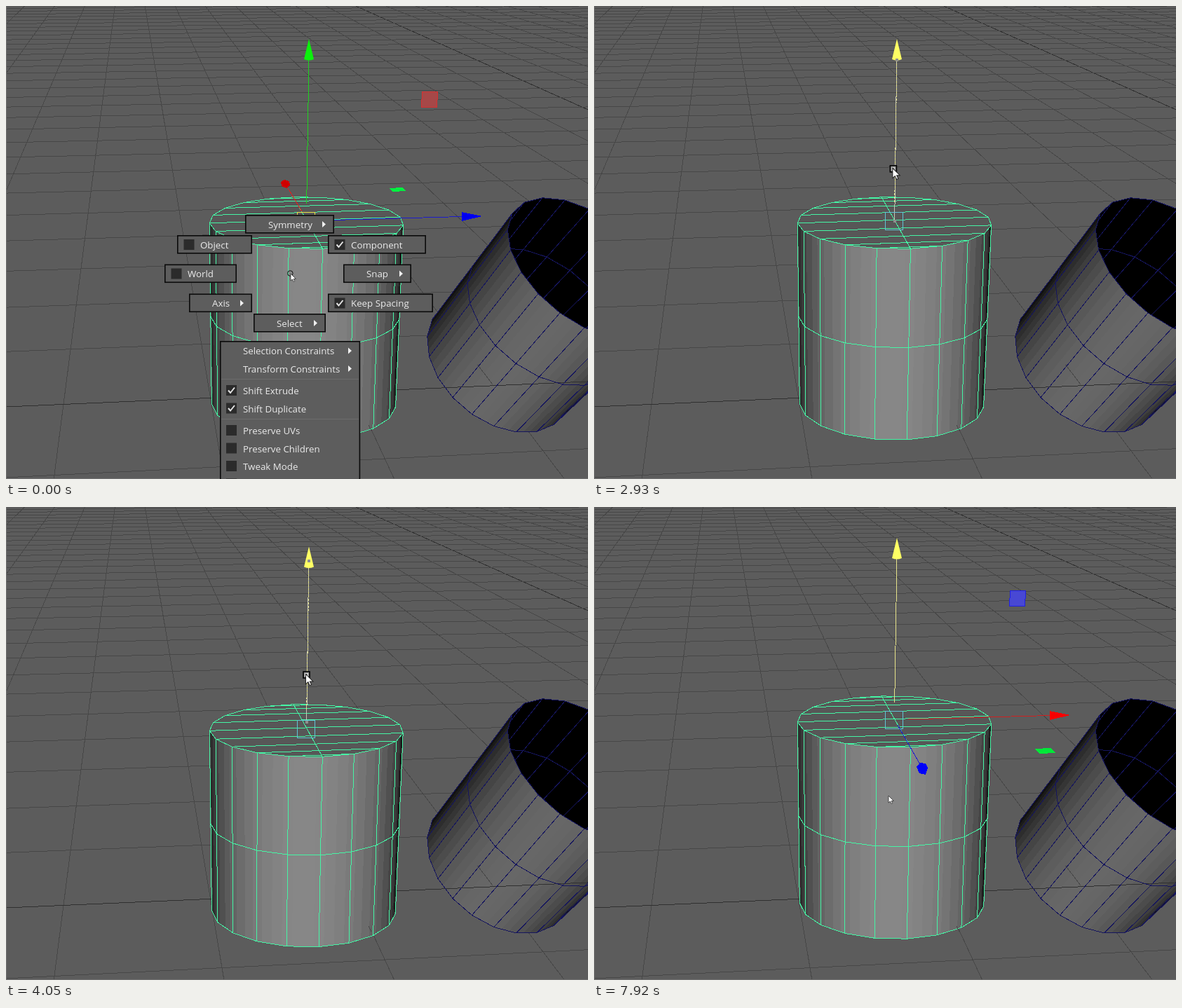
Write an HTML page that moves like this. It is 830 by 675 pixels and loops after 8000 ms.

```html
<!DOCTYPE html>
<html lang="en">
<head>
<meta charset="utf-8">
<title>Marking menu and move tool</title>
<style>
html, body { margin: 0; width: 100%; height: 100%; overflow: hidden; background: #5c5c5c; }
svg { display: block; }
text { font: 13.3px "Open Sans", "Noto Sans", sans-serif; fill: #eaeaea; }
.scene { shape-rendering: crispEdges; }
.face { fill: #5d5d5d; stroke: #0a0a0a; stroke-width: 1.6; }
.on .face { fill: #5285a6; }
.wire { fill: none; stroke: #45f5a5; }
.navy { fill: none; stroke: #15155e; }
</style>
</head>
<body>
<svg id="stage" width="830" height="675" viewBox="0 0 830 675"></svg>
<script>
const stage = document.getElementById('stage');

function add(parent, tag, attrs = {}, text) {
  const el = document.createElementNS('http://www.w3.org/2000/svg', tag);
  for (const key in attrs) el.setAttribute(key, attrs[key]);
  if (text) el.textContent = text;
  parent.append(el);
  return el;
}
const group = (parent, attrs) => add(parent, 'g', attrs);
const path = (parent, d, attrs) => add(parent, 'path', { d, ...attrs });
const line = (parent, a, b, attrs) => path(parent, poly([a, b]), attrs);
const poly = points => 'M' + points.join('L');
const grey = v => `rgb(${v},${v},${v})`;
const lerp = (a, b, p) => a + (b - a) * p;
const mix = (a, b, p) => a.map((v, i) => lerp(v, b[i], p));
const range = (from, to) => Array.from({ length: to - from + 1 }, (_, i) => from + i);

// ---- ground grid: two families of lines in perspective ----
const horizon = -145, vanishX = 174, farX = 16500;
const gridX = (k, y) => vanishX + (-0.129 + 0.296 * k) * (y - horizon);
const gridY = (row, x) => horizon + (1 - x / farX) / (0.0013947 + row * 0.000172);
const axisStyle = { stroke: '#303030' }, gridStyle = { stroke: '#474747' };

const scene = group(stage, { class: 'scene' });
const ground = group(scene, { fill: 'none' });
for (const k of range(-5, 14))
  line(ground, [gridX(k, 0), 0], [gridX(k, 675), 675], k === 8 ? axisStyle : gridStyle);
for (const row of range(-1, 33))
  line(ground, [0, gridY(row, 0)], [830, gridY(row, 830)], row === 0 ? axisStyle : gridStyle);
path(ground, 'M0.5 0V674.5H830', { stroke: '#707070' });

// ---- shared by both cylinders: 20 sides, thin facets lit from the viewer ----
const sides = 20, facets = 30;
const turn = i => i * 2 * Math.PI / sides;

// Point on the edge of a ring polygon at a fractional corner index.
const onEdge = (ring, i) => mix(ring(Math.floor(i)), ring(Math.floor(i) + 1), i % 1 < 0 ? i % 1 + 1 : i % 1);
function facetPath(upper, lower, first, n) {
  const a = first + n * 10 / facets, b = first + (n + 1) * 10 / facets;
  return poly([onEdge(upper, a), onEdge(upper, b), onEdge(lower, b), onEdge(lower, a)]) + 'Z';
}
const facetFill = (n, dark, bright) =>
  ({ fill: grey(Math.round(lerp(dark, bright, Math.sin((n + .5) / facets * Math.PI)))) });
const outline = ring => poly(range(0, sides - 1).map(ring)) + 'Z';

// ---- tilted cylinder: u runs from mouth (0) to foot (1) ----
const tiltRing = u => i => {
  const c = mix([828.5, 374.5], [703, 513], u);
  const a = mix([-106.5, -78.5], [-95, -66], u);
  const b = mix([-38.5, 63.5], [-38.5, 69.5], u);
  return c.map((v, n) => v + a[n] * Math.cos(turn(i)) + b[n] * Math.sin(turn(i)));
};
const mouth = tiltRing(0), waist = tiltRing(.5), foot = tiltRing(1);
const tilted = group(scene);
for (const n of range(0, facets - 1))
  path(tilted, facetPath(mouth, foot, 0, n), facetFill(n, 12, 103));
path(tilted, outline(mouth));
line(tilted, [600, gridY(0, 600)], [830, gridY(0, 830)], axisStyle);
line(tilted, [gridX(3, 512), 512], [gridX(3, 540), 540], gridStyle);

add(add(stage, 'clipPath', { id: 'mouth' }), 'path', { d: outline(mouth) });
const ribs = (from, to) => range(from, to).map(i => poly([mouth(i), foot(i)])).join('');
path(tilted, outline(mouth) + poly(range(0, 10).map(foot)) + poly(range(0, 10).map(waist)) + ribs(0, 10), { class: 'navy' });
path(tilted, outline(waist) + ribs(-9, -1), { class: 'navy', 'clip-path': 'url(#mouth)' });

// ---- selected cylinder: h is the depth below the resting top, in cylinder heights ----
const drumRing = h => i => {
  const drop = 275.4 * h / (1 + .0736 * h), u = drop / 256.5;
  const angle = turn(i + .5) - .008, near = 1 / (1 - .11 * Math.cos(angle));
  const dx = lerp(137.5, 130.5, u) * Math.sin(angle) * near;
  const dy = lerp(36.5, 51, u) * Math.cos(angle) * near;
  return [lerp(428.5, 424.5, u) + dx, 305.5 + drop + dy + dx * lerp(.009, .015, u)];
};
const drum = group(scene);
const drumFacets = range(0, facets - 1).map(n => path(drum, '', facetFill(n, 15, 135)));
const lid = path(drum, '', { fill: '#575757' });
const drumWire = path(drum, '', { class: 'wire' });
line(scene, [517, 598], [521, 606], gridStyle);

function shapeDrum(lift) {
  const h = lift / 275.4;
  const [top, half, base] = [0, .5, 1].map(d => drumRing(h + d));
  const front = range(-5, 4);
  drumFacets.forEach((el, n) => el.setAttribute('d', facetPath(top, base, -5.5, n)));
  lid.setAttribute('d', outline(top));
  drumWire.setAttribute('d', [
    outline(top), poly(front.map(half)), poly(front.map(base)),
    ...front.map(i => poly([top(i), base(i)])),
    ...range(1, 9).map(i => poly([top(i), top(sides - i)])),
    poly([top(0), top(10)])
  ].join(''));
}

// ---- manipulator ----
const ghostLine = line(scene, [431.7, 77], [428.7, 307], { stroke: '#c8c8b8' });
const gizmo = group(scene);
const shaft = line(gizmo, [432, 77], [428.7, 282]);
const cone = path(gizmo, 'M432 47L439 76Q432 79 425 76Z', { 'shape-rendering': 'auto' });
const center = add(gizmo, 'rect', { x: 415.5, y: 294.5, width: 25, height: 25, fill: 'none' });
const ghostDots = path(scene, 'M430 75h4v4h-4zM427 305h4v4h-4z', { fill: '#8f8f8f' });

function handles(side, sideLine, plane, planeEdge) {
  const g = group(gizmo);
  line(g, [448, 306], [650, 300.5], { stroke: sideLine });
  path(g, 'M650 294L679 300L650 307Z', { fill: side });
  path(g, 'M594 122L616 123L614 145L592 144Z', { fill: plane, stroke: planeEdge });
  return g;
}
const objectHandles = handles('#0000f0', '#1c1ccc', '#a64848', '#d83030');
line(objectHandles, [422, 293], [402, 260], { stroke: '#e02020' });
path(objectHandles, 'M392 251L397 248L404 250L405 255L400 260L393 257Z', { fill: '#d00000' });
path(objectHandles, 'M546 260L565 259L570 264L552 265Z', { fill: '#00f040' });

const worldHandles = handles('#f80000', '#d02020', '#4848d4', '#2020e0');
line(worldHandles, [433, 314], [466, 372], { stroke: '#1c1cd0' });
path(worldHandles, 'M460 374L465 368L473 369L476 375L473 385L464 383Z', { fill: '#0000f8' });
path(worldHandles, 'M628 348L652 347L658 354L635 355Z', { fill: '#00e838' });

// ---- marking menu ----
const menu = group(stage);
const label = (parent, x, y, text) => add(parent, 'text', { x, y }, text);
const arrow = (parent, x, y) => path(parent, `M${x} ${y - 4.5}l5 4.5l-5 4.5Z`, { fill: '#f0f0f0' });
function checkbox(parent, x, y, checked) {
  add(parent, 'rect', { x, y, width: 15, height: 15, fill: '#2b2b2b' });
  if (checked) path(parent, `M${x + 3} ${y + 7.5}l3 3.5l6 -7.5`, { fill: 'none', stroke: '#e4e4e4', 'stroke-width': 2 });
}
function button(text, x, y, width, mark) {
  const g = group(menu);
  add(g, 'rect', { class: 'face', x: x + .8, y: y + .8, width: width - 1.6, height: 25 });
  label(g, x + 33, y + 18.5, text);
  if (mark === 'arrow') arrow(g, x + width - 17, y + 13.5);
  else checkbox(g, x + 9.5, y + 6, mark === 'checked');
  return g;
}
button('Symmetry', 341, 298, 127, 'arrow');
const objectButton = button('Object', 244, 327, 107);
button('Component', 459, 327, 140, 'checked');
const worldButton = button('World', 226, 368.5, 103);
button('Snap', 481, 368.5, 97, 'arrow');
button('Axis', 261, 410.5, 90, 'arrow');
button('Keep Spacing', 459, 410.5, 150, 'checked');
button('Select', 353, 439, 103, 'arrow');

add(menu, 'rect', { class: 'face', x: 305.8, y: 478.8, width: 198.6, height: 230 });
let rowY = 492;
const sections = [['Selection Constraints', 'Transform Constraints'], ['Shift Extrude', 'Shift Duplicate'],
  ['Preserve UVs', 'Preserve Children', 'Tweak Mode', '']];
sections.forEach((items, s) => {
  if (s) {
    line(menu, [307, rowY - 10.5], [503, rowY - 10.5], { stroke: '#6c6c6c' });
    rowY += 6;
  }
  for (const text of items) {
    label(menu, 338, rowY + 5, text);
    if (s) checkbox(menu, 314, rowY - 8, s === 1);
    else arrow(menu, 488, rowY);
    rowY += 25.5;
  }
});
add(menu, 'circle', { cx: 405.3, cy: 381.5, r: 3.8, fill: 'none', stroke: '#111' });
const band = path(menu, '', { stroke: '#8e8e8e' });

// ---- cursor ----
const cursor = group(stage);
const badge = group(cursor);
add(badge, 'rect', { x: -3.5, y: -3.5, width: 9, height: 9, fill: '#8a8a8a', stroke: '#000', 'stroke-width': 1.6 });
add(badge, 'rect', { x: -1, y: -1, width: 4, height: 4, fill: 'none', stroke: '#ddd' });
const dash = line(badge, [6, 1], [16, 1], { stroke: '#000', 'stroke-width': 1.6 });
const pointer = path(cursor, 'M0 0V11L2.6 8.6L4.4 12.4L6.2 11.6L4.5 8H8Z',
  { fill: '#fff', stroke: '#222', 'stroke-width': .8 });

// ---- motion: each move goes to a place in a number of even, hard steps ----
const linear = p => p;
const sineIn = p => 1 - Math.cos(p * Math.PI / 2);
const sineOut = p => Math.sin(p * Math.PI / 2);
const sineInOut = p => (1 - Math.cos(p * Math.PI)) / 2;
const cubicOut = p => 1 - (1 - p) ** 3;

const cursorMoves = [
  { from: 1030, until: 1830, steps: 6, to: [323, 378], ease: linear },
  { from: 2230, until: 3230, steps: 8, to: [427.5, 229], ease: cubicOut },
  { from: 4930, until: 5440, steps: 5, to: [418, 450], ease: sineInOut },
  { from: 6000, until: 6560, steps: 4, to: [418, 433], ease: linear },
  { from: 7530, until: 7920, steps: 4, to: [420, 415], ease: linear }];
const liftMoves = [
  { from: 3350, until: 3750, steps: 4, to: [-38], ease: sineIn },
  { from: 3900, until: 4320, steps: 4, to: [57], ease: sineInOut },
  { from: 4470, until: 4600, steps: 2, to: [-3], ease: sineOut }];

function placeAt(moves, place, t) {
  for (const { from, until, steps, to, ease } of moves) {
    if (t < from) break;
    const step = Math.floor((t - from) / (until - from) * (steps - 1) + .15) + 1;
    place = mix(place, to, ease(Math.min(1, step / steps)));
  }
  return place;
}
const show = (el, on) => el.setAttribute('visibility', on ? 'visible' : 'hidden');

function draw(t) {
  const [lift] = placeAt(liftMoves, [0], t);
  const [x, baseY] = placeAt(cursorMoves, [406, 382], t);
  const y = baseY + lift;
  const menuOpen = t < 2230, dragging = t >= 2930 && t < 4930;
  const active = t >= 2800, tool = active && t < 7920;

  shapeDrum(lift);
  gizmo.setAttribute('transform', `translate(0 ${lift})`);
  for (const el of [ghostLine, ghostDots]) show(el, dragging);
  shaft.setAttribute('stroke', active ? '#e6e38a' : '#1fd41f');
  shaft.setAttribute('stroke-dasharray', dragging ? '3 2' : 'none');
  cone.setAttribute('fill', active ? '#ffff64' : '#0cf00c');
  center.setAttribute('stroke', t >= 2930 ? '#5fc4d6' : '#e6e04a');
  show(objectHandles, menuOpen);
  show(worldHandles, !menuOpen && !dragging);

  show(menu, menuOpen);
  objectButton.classList.toggle('on', t >= 1190 && t < 1350);
  worldButton.classList.toggle('on', t >= 1350);
  band.setAttribute('d', t >= 1030 ? poly([[401, 381], [x, y]]) : '');

  cursor.setAttribute('transform', `translate(${x} ${y})`);
  pointer.setAttribute('transform', `scale(${tool ? 1.3 : .92})`);
  show(badge, tool);
  show(dash, tool && t >= 6000);
}

const start = performance.now();
function tick(now) {
  draw(Math.max(0, now - start) % 8000);
  requestAnimationFrame(tick);
}
draw(0);
requestAnimationFrame(tick);
</script>
</body>
</html>
```
